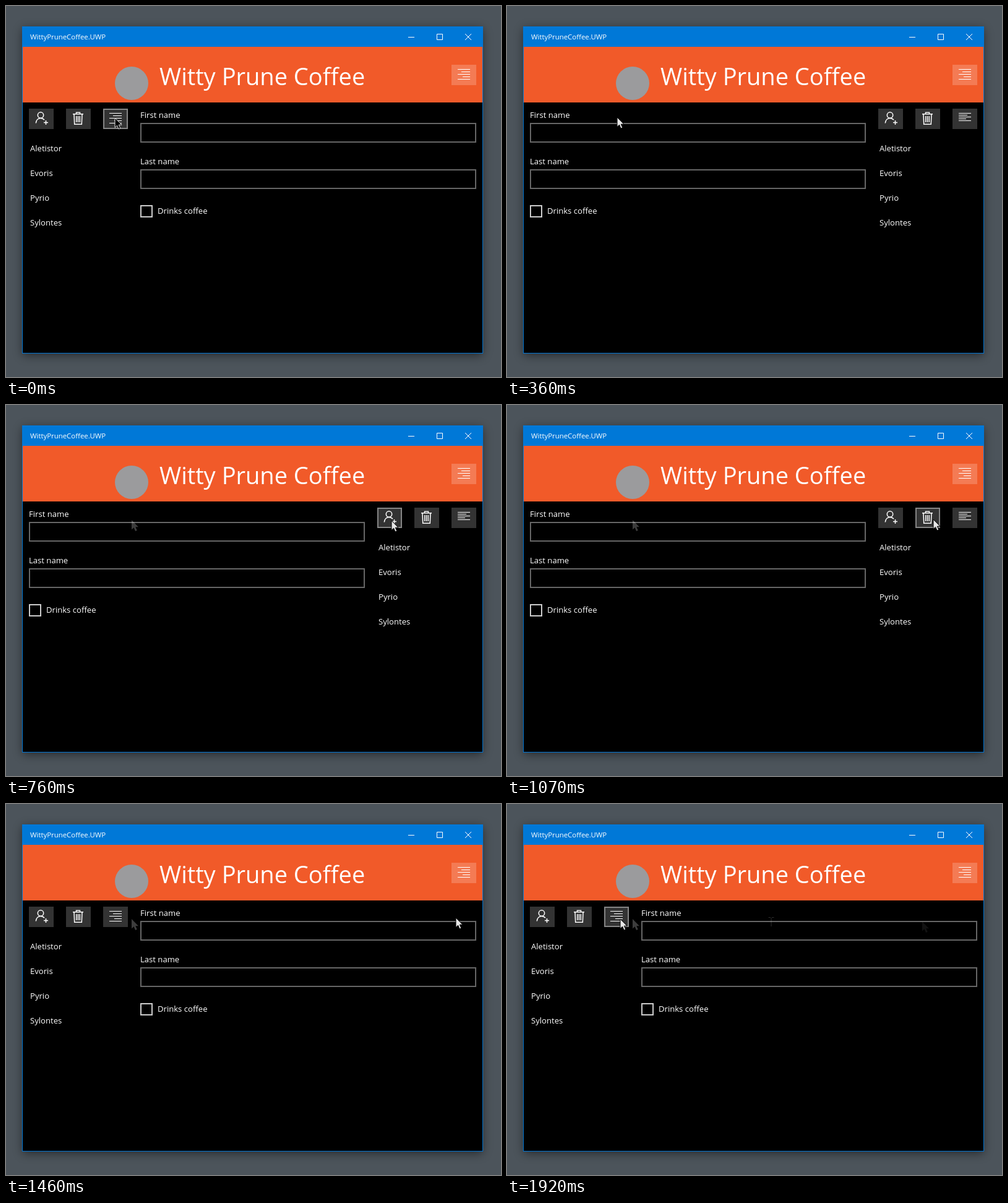
Write an HTML page that moves like this. It is 800 px wide and 600 px high and loops after 2000 ms.

```html
<!DOCTYPE html>
<html lang="en">
<head>
<meta charset="utf-8">
<title>Customer list</title>
<style>
html, body { margin: 0; width: 100%; height: 100%; overflow: hidden; background: #4c545b; }
svg { display: block; width: 100%; height: 100%; }
text { font-family: "Open Sans", "Noto Sans", sans-serif; font-size: 13.1px; fill: #fff; }
.line { fill: none; stroke: #fff; }
.box { fill: #000; stroke: #666; stroke-width: 2; }
.shadow { fill: #000; opacity: .5; filter: blur(8px); }
</style>
</head>
<body>
<svg id="stage" viewBox="0 0 800 600">
  <defs>
    <path id="arrow" d="M0 0V15.5L3.6 12.2 6 18 8.8 16.8 6.3 11.2H11Z"/>
    <path id="beam" d="M-4.5 .5H-1M1 .5H4.5M0 1V15" fill="none" stroke="#fff"/>
  </defs>
  <rect class="shadow" x="27" y="37" width="743" height="528"/>
  <rect x="26" y="33" width="745" height="529" fill="#0078d7"/>
  <rect x="27" y="66" width="743" height="90" fill="#f15a29"/>
  <rect x="27" y="156" width="743" height="405"/>
  <text x="39" y="54" style="font-size:11.4px">WittyPruneCoffee.UWP</text>
  <path class="line" d="M650 50.5H660M696.5 45.5H705.5V54.5H696.5ZM742 45L752 55M752 45L742 55"/>
  <circle cx="203" cy="125" r="27" fill="#9b9b9d"/>
  <text x="248" y="128" style="font-size:38px">Witty Prune Coffee</text>
  <rect x="720" y="95" width="40" height="33" fill="#f47b54"/>
  <path class="line" id="headIcon"/>

  <g id="nav">
    <g class="btn"><rect/>
      <g class="line" stroke-width="1.5">
        <circle cx="56" cy="176.5" r="4.7"/>
        <path d="M48.3 189.5C48.8 184.5 52 181.5 56 181.5C58.7 181.5 60.6 182.5 62 184.3M64.5 185V192M61 188.5H68"/>
      </g>
    </g>
    <g class="btn"><rect/>
      <path class="line" stroke-width="1.5" d="M108 174.7H125M113.5 174V172.2H119.5V174M110 175L110.7 191.3H122.3L123 175M113.7 178V188M116.5 178V188M119.3 178V188"/>
    </g>
    <g class="btn"><rect/><path class="line" id="sideIcon"/></g>
    <g id="names"></g>
  </g>

  <g id="form">
    <text x="217" y="181">First name</text>
    <rect class="box" id="first" x="218" y="190" width="541" height="30"/>
    <text x="217" y="256">Last name</text>
    <rect class="box" x="218" y="265" width="541" height="30"/>
    <rect x="218" y="323" width="18" height="18" fill="none" stroke="#ccc" stroke-width="2"/>
    <text x="245" y="336">Drinks coffee</text>
  </g>

  <g id="trails"></g>
  <circle id="click" cx="727" cy="183" r="12" fill="#d2cf1c" opacity=".85"/>
  <use id="pointer"/>
</svg>
<script>
const $ = id => document.getElementById(id);
const LOOP = 2000, NAV_SHIFT = 563, FORM_SHIFT = -180;
const set = (el, attrs) => Object.entries(attrs).forEach(([k, v]) => el.setAttribute(k, v));

function add(parent, tag, attrs, text = "") {
  const el = document.createElementNS("http://www.w3.org/2000/svg", tag);
  set(el, attrs);
  el.textContent = text;
  parent.append(el);
  return el;
}

// Paragraph glyph: alternating full and short lines.
function lines(x, y, gap, right) {
  return [20, 14, 20, 12, 20].map((w, i) =>
    `M${right ? x + 20 - w : x} ${y + i * gap}h${w}`).join("");
}

// Start time, pointer x and y, pointer shape.
const poses = [
  [0, 176, 181, "arrow"], [290, 176, 180, "arrow"], [360, 178, 180, "arrow"],
  [440, 203, 186, "arrow"], [510, 435, 194, "beam"], [590, 550, 193, "beam"],
  [670, 608, 188, "arrow"], [760, 623, 187, "arrow"], [830, 630, 187, "arrow"],
  [910, 647, 186, "arrow"], [990, 668, 185, "arrow"], [1070, 689, 185, "arrow"],
  [1150, 707, 184, "arrow"], [1230, 720, 184, "arrow"], [1310, 727, 184, "arrow"],
  [1460, 727, 184, "arrow"], [1540, 671, 190, "arrow"], [1610, 560, 188, "beam"],
  [1700, 427, 183, "beam"], [1770, 300, 183, "beam"], [1850, 215, 183, "arrow"],
  [1920, 183, 186, "arrow"]
];

const trails = [
  [510, 203, 186, "arrow", .24], [1610, 671, 190, "arrow", .07],
  [1770, 427, 183, "beam", .18]
].map(([from, x, y, shape, opacity]) => ({
  from, el: add($("trails"), "use", { href: "#" + shape, x, y, opacity, fill: "#fff" })
}));

const buttons = [...document.querySelectorAll(".btn rect")];
buttons.forEach((b, i) => set(b, { x: 37 + i * 60, y: 166, width: 40, height: 33 }));
["Aletistor", "Evoris", "Pyrio", "Sylontes"].forEach((name, i) =>
  add($("names"), "text", { x: 39, y: 235 + i * 40 }, name));
set($("headIcon"), { d: lines(730, 102.5, 4, true) });

function render(t) {
  const [, x, y, shape] = poses.findLast(p => p[0] <= t);
  const swapped = t >= 360 && t < 1460;
  const pressed = t >= 290 && t < 360 || t >= 1380 && t < 1460;
  const shift = swapped ? NAV_SHIFT : 0;

  set($("nav"), { transform: `translate(${shift})` });
  set($("form"), { transform: `translate(${swapped ? FORM_SHIFT : 0})` });
  buttons.forEach((b, i) => {
    const left = 37 + i * 60;
    const over = x >= left + shift && x < left + 40 + shift;
    const ring = over && !pressed;
    set(b, {
      x: left + ring, y: 166 + ring, width: 40 - 2 * ring, height: 33 - 2 * ring,
      fill: over && pressed ? "#666" : "#333",
      stroke: ring ? "#858585" : "none", "stroke-width": 2
    });
  });
  const flat = swapped && !pressed || pressed && t < 360;
  set($("sideIcon"), { d: lines(167, 173.5, flat ? 3 : 4, !swapped) });
  $("first").style.stroke = shape === "beam" ? "#999" : "";
  trails.forEach(({ from, el }) => set(el, { visibility: t >= from ? "visible" : "hidden" }));
  set($("click"), { visibility: t >= 1380 && t < 1460 ? "visible" : "hidden" });

  const dark = t < 360;
  set($("pointer"), {
    href: "#" + shape, x, y,
    fill: dark ? "#000" : "#e8e8e8",
    stroke: dark ? "#ddd" : "#000", "stroke-width": 1
  });
}

function tick(now) {
  render(now % LOOP);
  requestAnimationFrame(tick);
}
render(0);
requestAnimationFrame(tick);
</script>
</body>
</html>
```
